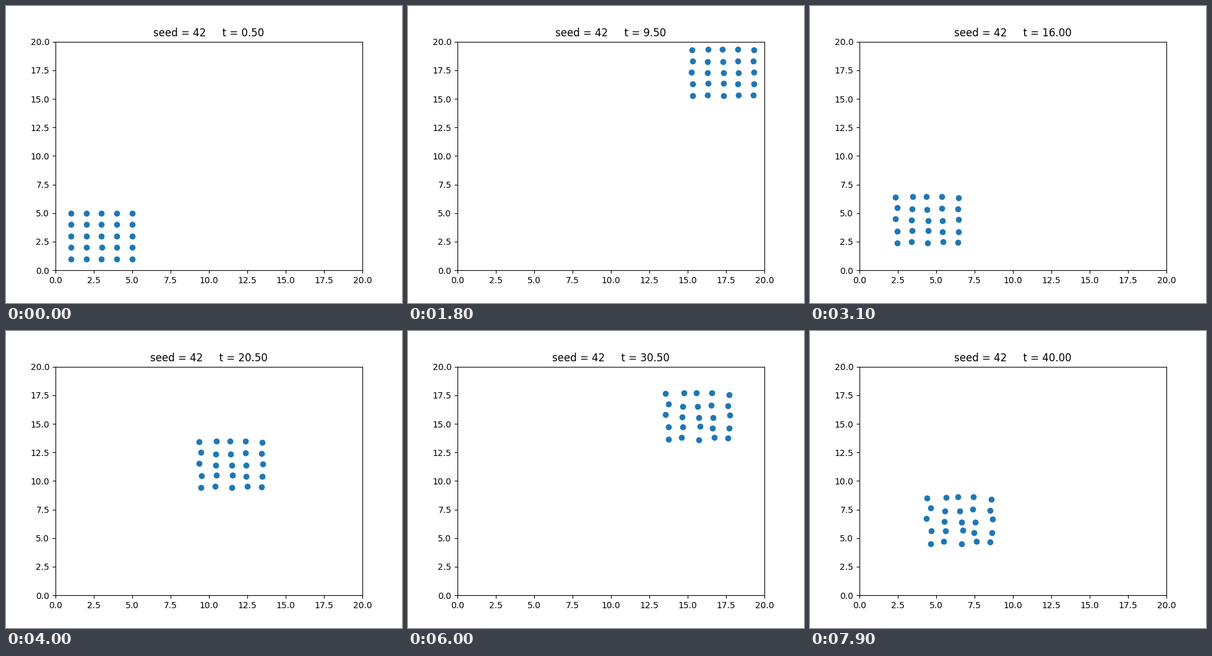
A matplotlib script for the animation above (8 s loop, 640x480 px).

```python
import numpy as np
import matplotlib.pyplot as plt
from matplotlib.animation import FuncAnimation

SEED = 42
SIDE = 5          # particles per row and column
BOX = 20.0        # periodic box size
DT = 0.5
ACCEL = 1 / 3
FRAMES = 80

rng = np.random.default_rng(SEED)
start = np.array([(x, y) for x in range(1, SIDE + 1)
                  for y in range(1, SIDE + 1)], dtype=float)
v0 = 0.01 * rng.random((SIDE * SIDE, 2))


def positions(n):
    """Positions after n explicit Euler steps, wrapped into the box."""
    shift = v0 * n * DT + ACCEL * DT**2 * n * (n - 1) / 2
    return (start + shift) % BOX


fig, ax = plt.subplots(figsize=(6.4, 4.8), dpi=100)
ax.set_xlim(0, BOX)
ax.set_ylim(0, BOX)
dots = ax.scatter(start[:, 0], start[:, 1])
title = ax.set_title("")


def update(i):
    n = i + 1
    dots.set_offsets(positions(n))
    title.set_text(f"seed = {SEED}     t = {n * DT:.2f}")
    return dots, title


anim = FuncAnimation(fig, update, frames=FRAMES, interval=100,
                     repeat=True, repeat_delay=0, blit=False)
plt.show()
```
